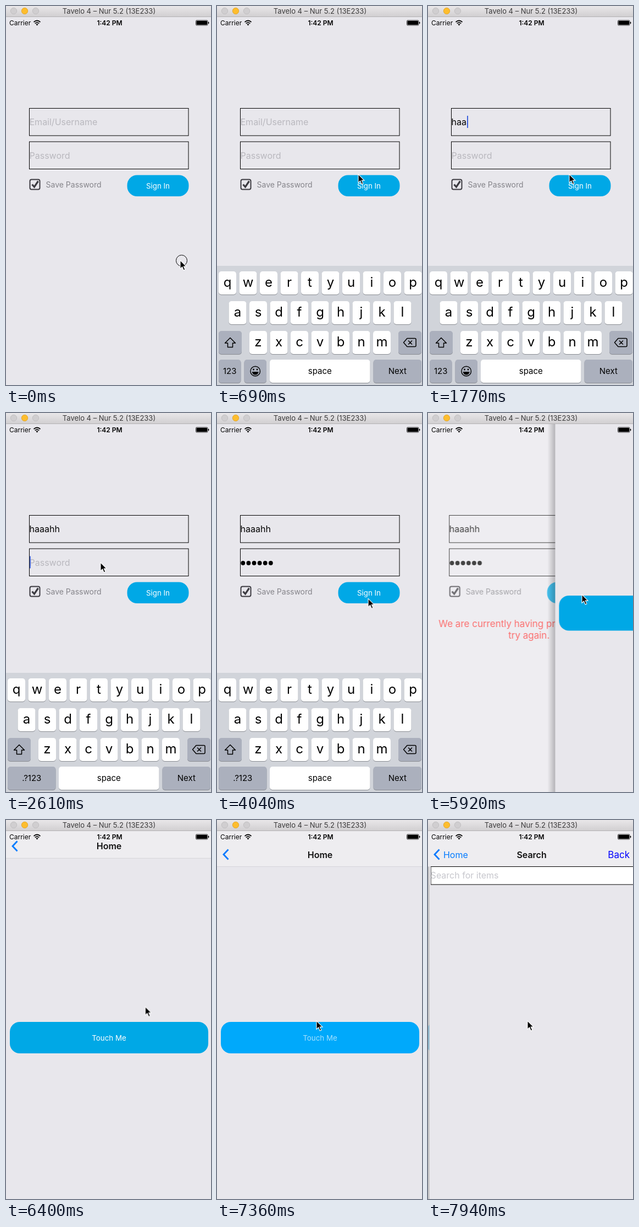
An HTML page that plays this animation: 373x687 px, repeating every 8 s.

```html
<!DOCTYPE html>
<html lang="en">
<head>
<meta charset="utf-8">
<title>Sign-in flow</title>
<style>
html, body { margin: 0; width: 100%; height: 100%; overflow: hidden; background: #fff; }
svg { display: block; width: 100vw; height: 100vh; }
text { font-family: Inter, "Open Sans", sans-serif; font-size: 16px; }
.mid { text-anchor: middle; }
.hint { fill: #b9b8be; }
.line { fill: none; stroke: #000; }
.bg { fill: #e8e7ec; }
.blue { fill: #00a8e6; }
.anim { animation: 8s linear infinite; }
.cut { animation: 8s step-end infinite; }

#cursor { animation-name: cursor; }
@keyframes cursor {
  0%, 1.25% { transform: translate(317px, 461px); }
  3%, 4.4% { transform: translate(262px, 232px); }
  7.25%, 25.1% { transform: translate(257px, 305px); }
  28%, 41.3% { transform: translate(172px, 271px); }
  46%, 47.5% { transform: translate(270px, 344px); }
  53.4%, 78.4% { transform: translate(280px, 329px); }
  84.4%, 100% { transform: translate(181px, 364px); }
}
#ring { animation-name: ring; }
@keyframes ring { 0% { opacity: 1; } 1.4%, 100% { opacity: 0; } }

#keyboard { animation-name: keyboard; }
@keyframes keyboard {
  0%, 3.1% { transform: translateY(217px); animation-timing-function: cubic-bezier(.3, .7, .3, 1); }
  7.6%, 56% { transform: none; animation-timing-function: cubic-bezier(.3, .6, .4, 1); }
  59.8%, 100% { transform: translateY(217px); }
}
#numEmoji { animation-name: untilPassword; }
#numWide { animation-name: fromPassword; }
@keyframes untilPassword { 0% { opacity: 1; } 31.1%, 100% { opacity: 0; } }
@keyframes fromPassword { 0% { opacity: 0; } 31.1%, 100% { opacity: 1; } }

#userHint { animation-name: userHint; }
@keyframes userHint { 0% { opacity: 1; } 19.1%, 100% { opacity: 0; } }
#passHint { animation-name: passHint; }
@keyframes passHint { 0% { opacity: 1; } 37%, 100% { opacity: 0; } }
#userMask { animation-name: userMask; }
@keyframes userMask {
  0% { width: 0; } 19.1% { width: 19px; } 22.1% { width: 28px; } 23.6% { width: 37px; }
  25.1% { width: 46.5px; } 26.6%, 100% { width: 70px; }
}
#passMask { animation-name: passMask; }
@keyframes passMask {
  0% { width: 0; } 37% { width: 10px; } 38.5% { width: 20.2px; } 40% { width: 30.4px; }
  41.5% { width: 40.6px; } 43% { width: 50.8px; } 44.5%, 100% { width: 70px; }
}
#userCaret { animation-name: userCaret; }
@keyframes userCaret {
  0% { opacity: 0; } 2.9% { opacity: 1; } 7.75% { opacity: 0; } 13.1% { opacity: .5; }
  14.4% { opacity: 1; transform: none; }
  19.1% { transform: translateX(19px); } 22.1% { transform: translateX(28px); }
  23.6% { transform: translateX(37px); } 25.1% { transform: translateX(46.5px); }
  26.6% { opacity: 1; transform: translateX(56px); }
  31.1%, 100% { opacity: 0; transform: translateX(56px); }
}
#passCaret { animation-name: passCaret; }
@keyframes passCaret {
  0% { opacity: 0; } 31.1% { opacity: .85; transform: none; }
  37% { transform: translateX(10px); } 38.5% { transform: translateX(20px); }
  40% { transform: translateX(30px); } 41.5% { transform: translateX(40px); }
  43% { transform: translateX(50px); } 44.5% { opacity: .85; transform: translateX(60px); }
  50%, 100% { opacity: 0; transform: translateX(60px); }
}

#spinner { animation-name: waiting; }
@keyframes waiting { 0% { opacity: 0; } 56.4% { opacity: 1; } 68.1%, 100% { opacity: 0; } }
#spokes { animation: spin 1s steps(12) infinite; }
@keyframes spin { to { transform: rotate(360deg); } }
#error { animation-name: error; }
@keyframes error { 0% { opacity: 0; } 68.1%, 100% { opacity: 1; } }

#login { animation-name: login; }
@keyframes login {
  0%, 71.45% { opacity: 1; transform: none; }
  78.2% { opacity: .3; transform: translateX(-10px); }
  78.21%, 100% { opacity: 0; transform: translateX(-10px); }
}
#home { animation-name: home; }
@keyframes home {
  0%, 71.44% { transform: translateX(395px); }
  71.45% { transform: translateX(373px); }
  78.2%, 92.56% { opacity: 1; transform: none; }
  99.31%, 100% { opacity: .3; transform: translateX(-10px); }
}
#search { animation-name: search; }
@keyframes search {
  0%, 92.55% { transform: translateX(395px); }
  92.56% { transform: translateX(373px); }
  99.31%, 100% { transform: none; }
}
#tallButton { animation-name: untilNav; }
#navButton { animation-name: fromNav; }
@keyframes untilNav { 0% { opacity: 1; } 78.2%, 100% { opacity: 0; } }
@keyframes fromNav { 0% { opacity: 0; } 78.2%, 100% { opacity: 1; } }
#touchFill { animation-name: touchFill; }
@keyframes touchFill { 0% { fill: #00a8e6; } 90.5%, 100% { fill: #00a9fb; } }
#touchText { animation-name: touchText; }
@keyframes touchText { 0% { opacity: 1; } 90.5%, 100% { opacity: .65; } }

#nav { animation-name: nav; }
@keyframes nav {
  0%, 78.2% { transform: translateY(-66px); animation-timing-function: ease-out; }
  81.3%, 100% { transform: none; }
}
#homeTitle { animation-name: homeTitle; }
@keyframes homeTitle {
  0%, 92.56% { opacity: 1; transform: none; }
  97%, 100% { opacity: 0; transform: translateX(-105px); }
}
#backLabel { animation-name: backLabel; }
@keyframes backLabel {
  0%, 92.56% { opacity: 0; transform: translateX(138px); }
  99.31%, 100% { opacity: 1; transform: none; }
}
#searchTitle { animation-name: searchTitle; }
@keyframes searchTitle {
  0%, 92.56% { opacity: 0; transform: translateX(150px); }
  99.31%, 100% { opacity: 1; transform: none; }
}
#backLink { animation-name: backLink; }
@keyframes backLink { 0%, 92.56% { opacity: 0; } 98.5%, 100% { opacity: 1; } }
</style>
</head>
<body>
<svg viewBox="0 0 373 687" preserveAspectRatio="none">
  <defs>
    <linearGradient id="bar" x2="0" y2="1">
      <stop stop-color="#e9e7e9"/><stop offset="1" stop-color="#d0ced0"/>
    </linearGradient>
    <linearGradient id="shade">
      <stop stop-color="#000" stop-opacity="0"/><stop offset="1" stop-color="#000" stop-opacity=".24"/>
    </linearGradient>
    <clipPath id="userClip"><rect id="userMask" class="cut" x="43" y="190" width="0" height="40"/></clipPath>
    <clipPath id="passClip"><rect id="passMask" class="cut" x="42" y="250" width="0" height="40"/></clipPath>
  </defs>
  <rect width="373" height="687" fill="#fff"/>

  <g id="login" class="anim">
    <rect class="bg" width="373" height="687"/>
    <rect class="line" x="42.5" y="185.5" width="289.5" height="49.5"/>
    <rect class="line" x="42.5" y="246" width="289.5" height="49.5"/>
    <text id="userHint" class="hint cut" x="42.5" y="216">Email/Username</text>
    <text id="passHint" class="hint cut" x="42.5" y="276.5">Password</text>
    <text x="42.5" y="216" clip-path="url(#userClip)">haaahh</text>
    <g id="dots" clip-path="url(#passClip)"></g>
    <rect id="userCaret" class="cut" x="43" y="199" width="2" height="22" fill="#3f63dc"/>
    <rect id="passCaret" class="cut" x="43" y="259.5" width="2" height="22" fill="#3f63dc"/>
    <rect x="43.5" y="314.5" width="18" height="18" rx="3" fill="none" stroke="#3c3b41" stroke-width="2"/>
    <path d="M47.5 323.5l4 4.5 7-10.5" fill="none" stroke="#3c3b41" stroke-width="3.2"/>
    <text x="72.5" y="329" fill="#85848a" style="font-size:14px">Save Password</text>
    <rect class="blue" x="220.5" y="306.5" width="112" height="38.5" rx="18"/>
    <text class="mid" x="276.5" y="331" fill="#fff" style="font-size:13.3px">Sign In</text>
    <g id="spinner" class="cut"><g transform="translate(187.5 360)"><g id="spokes"></g></g></g>
    <g id="error" class="cut" fill="#fb3b3b">
      <text x="23" y="387.5" style="font-size:17px">We are currently having problems, please</text>
      <text class="mid" x="187.5" y="409" style="font-size:17px">try again.</text>
    </g>
  </g>

  <g id="keyboard" class="anim">
    <rect y="471" width="373" height="217" fill="#d1d4da"/>
    <g id="keys"></g>
    <g fill="none" stroke="#000" stroke-width="1.5" stroke-linejoin="round">
      <path d="M24 601.5l9.5 9.5h-5v7.5h-9V611h-5z"/>
      <path d="M339.5 610l6.5-7.5h14q2 0 2 2v11q0 2-2 2h-14zM348 606.500l7 7m0-7l-7 7"/>
    </g>
    <g id="numEmoji" class="cut">
      <g id="narrowKeys"></g>
      <circle class="line" cx="69.700" cy="662" r="8.800" stroke-width="1.400"/>
      <circle cx="66.500" cy="659" r="1.400"/><circle cx="73" cy="659" r="1.400"/>
      <path d="M63.700 663h12q-1 5.500-6 5.500t-6-5.500z"/>
    </g>
    <g id="numWide" class="cut"></g>
  </g>

  <g id="home" class="anim">
    <rect x="-14" y="20" width="14" height="667" fill="url(#shade)"/>
    <rect class="bg" width="373" height="687"/>
    <g id="tallButton" class="cut">
      <rect class="blue" x="7" y="331" width="361" height="63.500" rx="18"/>
      <text class="mid" x="187.500" y="367.500" fill="#fff" style="font-size:13.300px">Touch Me</text>
    </g>
    <g id="navButton" class="cut">
      <rect id="touchFill" class="cut" x="7" y="366" width="361" height="57" rx="18"/>
      <text id="touchText" class="mid cut" x="187.500" y="399.500" fill="#fff" style="font-size:13.300px">Touch Me</text>
    </g>
  </g>

  <g id="search" class="anim">
    <rect x="-14" y="85" width="14" height="602" fill="url(#shade)"/>
    <rect class="bg" width="373" height="687"/>
  </g>

  <g id="nav" class="anim">
    <rect y="20" width="373" height="64" fill="#eeedf0"/>
    <rect y="84" width="373" height="1" fill="#d6d5da"/>
    <path d="M20.500 53.500l-8.500 9 8.500 9" fill="none" stroke="#007aff" stroke-width="2.800"/>
    <g id="homeTitle" class="anim"><text class="mid" x="187.500" y="68.500" font-weight="600" fill="#111">Home</text></g>
    <g id="backLabel" class="anim"><text x="27" y="68.500" fill="#007aff">Home</text></g>
    <g id="searchTitle" class="anim"><text class="mid" x="187.500" y="68.500" font-weight="600" fill="#111">Search</text></g>
    <g id="backLink" class="anim"><text x="367" y="68.500" text-anchor="end" fill="#00f" style="font-size:17px">Back</text></g>
  </g>
  <g id="search" class="anim">
    <rect x="2.500" y="84.500" width="380" height="32.500" fill="#fff" stroke="#000"/>
    <text class="hint" x="2" y="106" style="fill:#c7c7cd">Search for items</text>
  </g>

  <g id="status">
    <text x="6" y="34.500" style="font-size:12px">Carrier</text>
    <g fill="none" stroke="#000" stroke-width="1.700">
      <path d="M50.500 29.200q6-5.400 12 0M52.700 31.700q3.800-3.200 7.600 0"/>
    </g>
    <path d="M54.300 33.200q2.200-1.600 4.400 0l-2.200 2.200z"/>
    <text class="mid" x="188.500" y="34.500" font-weight="600" style="font-size:12px">1:42 PM</text>
    <rect class="line" x="345.500" y="26" width="21.500" height="9" rx="1.500" stroke-width=".8"/>
    <rect x="346.500" y="27" width="19.500" height="7" rx=".7"/>
    <rect x="367.700" y="28.700" width="1.600" height="3.600" rx=".8"/>
  </g>
  <g>
    <rect width="373" height="20" fill="url(#bar)"/>
    <rect y="19" width="373" height="1" fill="#b4b2b4"/>
    <g stroke="#bcbabc" stroke-width=".8" fill="#d0ced0">
      <circle cx="14" cy="9" r="5.700"/>
      <circle cx="34" cy="9" r="5.700" fill="#fdbd2e" stroke="#dfa023"/>
      <circle cx="54" cy="9" r="5.700"/>
    </g>
    <text class="mid" x="187.500" y="14" fill="#3b3a3b" style="font-size:13px">Tavelo 4 – Nur 5.2 (13E233)</text>
  </g>

  <circle id="ring" class="line cut" cx="319.500" cy="461.500" r="10"/>
  <path id="cursor" class="anim" d="M0 0V15.300L3.600 12 6.200 18 8.800 16.900 6.300 11.100H11Z" stroke="#fff" stroke-width="1.100"/>
</svg>
<script>
const byId = id => document.getElementById(id);

function add(parent, tag, attrs, label) {
  const el = document.createElementNS('http://www.w3.org/2000/svg', tag);
  for (const name in attrs) el.setAttribute(name, attrs[name]);
  if (label) el.textContent = label;
  parent.append(el);
}

function addKey(parent, x, y, width, label, size = 15, fill = '#fff') {
  const box = { x, width, height: 42, rx: 5 };
  add(parent, 'rect', { ...box, y: y + 1, fill: '#8a8d93' });
  add(parent, 'rect', { ...box, y, fill });
  const baseline = y + (size > 20 ? 27.5 : 26);
  add(parent, 'text', { class: 'mid', x: x + width / 2, y: baseline, style: `font-size:${size}px` }, label);
}

const keys = byId('keys');
const gray = '#abb0bd';
const rows = [['qwertyuiop', 3, 481], ['asdfghjkl', 21.5, 535], ['zxcvbnm', 59, 589]];
for (const [letters, left, y] of rows)
  [...letters].forEach((letter, i) => addKey(keys, left + 37.5 * i, y, 32, letter, 24));
addKey(keys, 3, 589, 42, '', 15, gray);
addKey(keys, 330, 589, 42, '', 15, gray);
addKey(keys, 96, 641, 182.5, 'space');
addKey(keys, 284.5, 641, 87.5, 'Next', 15, gray);
addKey(byId('narrowKeys'), 3, 641, 40.5, '123', 15, gray);
addKey(byId('narrowKeys'), 49.5, 641, 40.5, '', 15, gray);
addKey(byId('numWide'), 3, 641, 87.5, '.?123', 15, gray);

for (let i = 0; i < 6; i++)
  add(byId('dots'), 'circle', { cx: 47.3 + 10.1 * i, cy: 272, r: 3.9 });

for (let i = 0; i < 12; i++)
  add(byId('spokes'), 'rect', {
    x: -1, y: -10, width: 2, height: 5.2, rx: 1, fill: '#1a9fd8',
    opacity: Math.max(.3, 1 - (11 - i) * .09), transform: `rotate(${30 * i})`
  });
</script>
</body>
</html>
```
